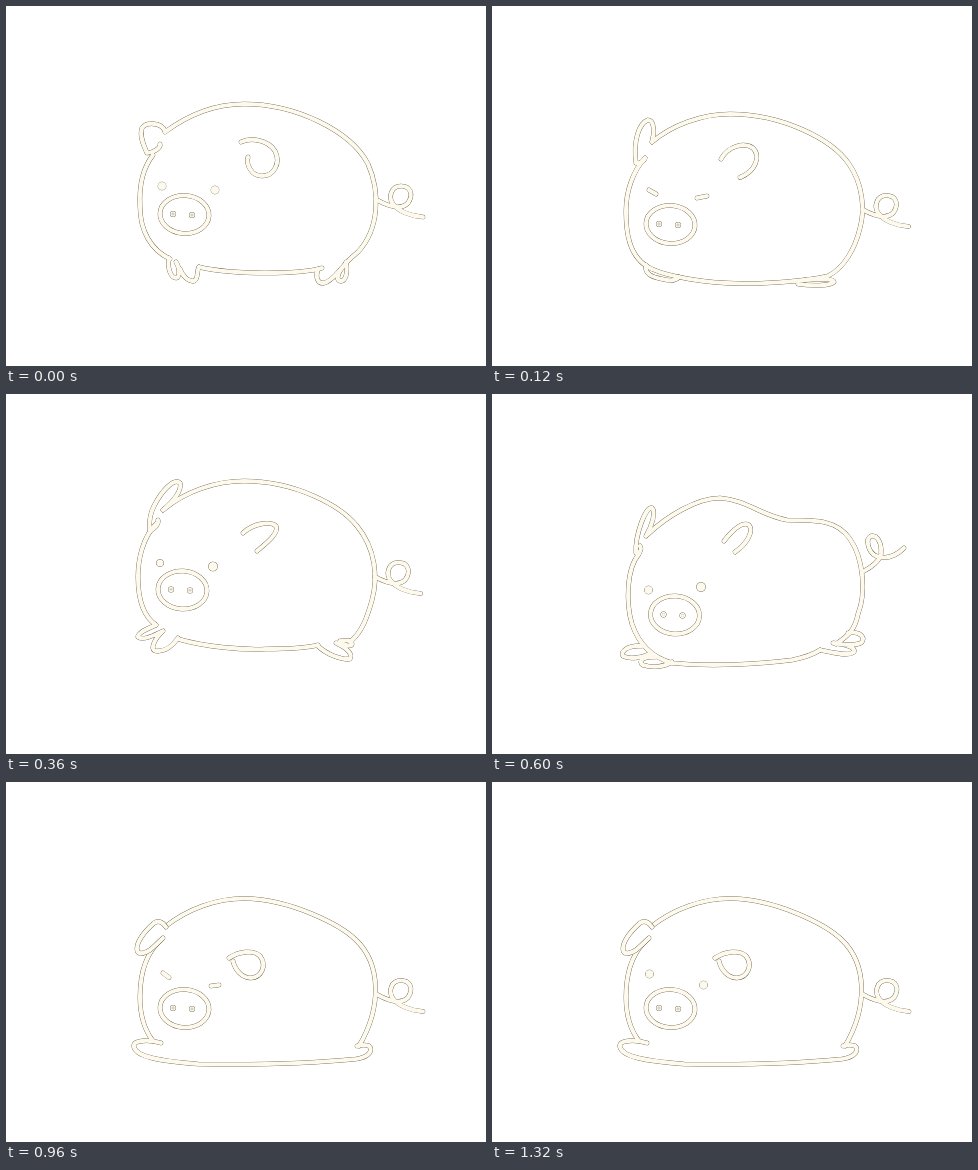
These frames come from a looping animation (480 px wide and 360 px high, 1920 ms). An HTML page:

```html
<!DOCTYPE html>
<html lang="en">
<head>
<meta charset="utf-8">
<title>Bouncing piglet</title>
<style>
html, body { margin: 0; width: 100%; height: 100%; overflow: hidden; background: #fff; }
svg { display: block; width: 100vw; height: 100vh; }

path, ellipse, circle {
  stroke: currentColor;
  fill: none;
  stroke-linecap: round;
  stroke-linejoin: round;
}
circle { fill: currentColor; }
.edge { color: #4a4228; stroke-width: 4.6px; }
.ink { color: #fdf9ec; stroke-width: 4.1px; }

/* each pose owns a slice of the 1920 ms loop */
.pose { visibility: hidden; animation: 1920ms step-end infinite; }
.stand { animation-name: stand; }
.dip { animation-name: dip; }
.crouch { animation-name: crouch; }
.leap { animation-name: leap; }
.land { animation-name: land; }
.flat { animation-name: flat; }
.perk { animation-name: perk; }
.droop { animation-name: droop; }
.shut { animation-name: shut; }
.open { animation-name: open; }
@keyframes stand { 0% { visibility: visible } 6.25%, 100% { visibility: hidden } }
@keyframes dip { 0% { visibility: hidden } 6.25% { visibility: visible } 12.5%, 100% { visibility: hidden } }
@keyframes crouch { 0% { visibility: hidden } 12.5% { visibility: visible } 18.75%, 100% { visibility: hidden } }
@keyframes leap { 0% { visibility: hidden } 18.75% { visibility: visible } 31.25%, 100% { visibility: hidden } }
@keyframes land { 0% { visibility: hidden } 31.25% { visibility: visible } 43.75%, 100% { visibility: hidden } }
@keyframes flat { 0% { visibility: hidden } 43.75%, 100% { visibility: visible } }
@keyframes perk { 0% { visibility: hidden } 43.75% { visibility: visible } 50%, 100% { visibility: hidden } }
@keyframes droop { 0% { visibility: hidden } 50%, 100% { visibility: visible } }
@keyframes shut { 0% { visibility: hidden } 43.75% { visibility: visible } 68.75%, 100% { visibility: hidden } }
@keyframes open { 0% { visibility: hidden } 68.75%, 100% { visibility: visible } }
</style>
</head>
<body>
<svg viewBox="0 0 480 360">
<defs>
  <!-- shared parts, placed for the standing pose -->
  <g id="snout">
    <ellipse cx="178.5" cy="208.5" rx="24.5" ry="19" transform="rotate(4 178.5 208.5)"/>
    <circle cx="167" cy="208" r=".7"/>
    <circle cx="186" cy="209" r=".7"/>
  </g>
  <path id="tail" d="M371 194C380 199 394 205 402 197C408 188 404 180 395 180C385 180 382 191 387 198C392 205 404 210 417 211"/>
  <g id="squint">
    <path d="M157 191L163 195.5"/>
    <path d="M205 204L213 203"/>
  </g>

  <g id="stand">
    <path d="M159 126C178 112 206 98 238 98C290 98 345 125 362 158C374 185 374 222 352 246C346 251 341 255 336 262"/>
    <path d="M147 149C136 163 133 180 134 200C134 225 145 244 164 253"/>
    <path d="M193 261C215 266 240 267 260 267C285 267 302 266 316 262"/>
    <path d="M159 125C155 116 140 116 136 122C133 130 138 140 141 147C147 147 155 142 154 138"/>
    <path d="M235 136C245 131 262 134 269 145C275 157 268 170 256 170C245 170 240 158 242 151"/>
    <path d="M163 252C161 262 165 272 170 272C174 271 174 262 170 256"/>
    <path d="M174 263C176 269 182 276 188 275C193 273 190 266 193 261"/>
    <path d="M312 263C309 272 312 278 318 277C326 275 330 268 336 262"/>
    <path d="M340 256C342 266 340 276 334 275C330 274 332 268 335 263"/>
    <circle cx="156" cy="180" r="2"/>
    <circle cx="209" cy="184" r="2"/>
    <use href="#snout"/>
    <use href="#tail"/>
  </g>

  <g id="dip">
    <path d="M160 136C180 119 210 108 238 108C290 108 340 133 357 158C371 178 373 204 368 222C363 243 352 262 336 270C315 275 275 278 250 277.5C210 277 175 270 160 263C135 252 134 222 134 205C134 185 141 165 153 152"/>
    <path d="M160 136C163 126 162 114 156 114C147 117 141 135 144 157C147 158 152 156 153 152"/>
    <path d="M229 153C236 140 252 136 261 142C269 150 264 165 248 171.5"/>
    <path d="M154 259C152 268 160 271 170 273C178 275 184 275 187 271"/>
    <path d="M306 278C320 280 338 280 342 276C342 272 325 273 312 274"/>
    <path d="M157 184L164 188"/>
    <path d="M205 192L215 190"/>
    <use href="#snout" y="10"/>
    <use href="#tail" x="-.5" y="9.5"/>
  </g>

  <g id="crouch">
    <path d="M160 144C182 127 210 116 238 116C285 116 335 143 350 158C371 178 375 210 367 235C361 254 350 269 336 276C315 280 275 282 250 282C210 282 175 277 158 269C135 258 134 232 134 215C134 195 138 172 156 157"/>
    <path d="M160 144C163 136 164 125 158 124C150 126 142 146 144 165C149 164 155 160 156 156"/>
    <path d="M226 165C234 155 247 151 255 156C260 163 253 174 240 179"/>
    <path d="M151 262C147 272 158 276 170 278C178 280 184 280 187 277"/>
    <path d="M308 281C322 283 340 282 344 279C345 276 330 277 318 278"/>
    <use href="#squint"/>
    <use href="#snout" y="18"/>
    <use href="#tail" y="18.5"/>
  </g>

  <g id="leap">
    <path d="M157 116C180 97 210 87 238 87C290 87 335 112 351 132C370 155 372 184 366 206C361 224 356 238 344 248"/>
    <path d="M150 130C137 143 132 165 132 183C132 205 137 222 150 231"/>
    <path d="M172 245C200 253 235 256 260 255C285 255 300 254 312 251"/>
    <path d="M157 116C168 107 176 96 174 89C168 83 155 98 148 112C143 122 143 130 144 137C149 134 153 130 152 126"/>
    <path d="M237 139C248 129 264 127 270 132C273 139 262 148 251 157"/>
    <path d="M150 231C140 235 131 240 132 243C138 247 148 241 157 237C149 244 143 256 150 257C160 258 168 250 172 244"/>
    <path d="M312 252C320 260 335 266 344 265C347 259 340 254 330 249C338 250 346 254 346 250C346 246 340 246 334 247"/>
    <circle cx="154" cy="169" r="1.5"/>
    <circle cx="207" cy="172.5" r="2.5"/>
    <use href="#snout" x="-2" y="-12.5"/>
    <use href="#tail" x="-2.5" y="-11.5"/>
  </g>

  <g id="land">
    <path d="M155 141C175 122 205 104 228 104C255 106 270 122 295 126C325 126 345 126 358 145C372 165 374 200 366 220C363 236 356 242 344 250"/>
    <path d="M147 160C134 175 134 210 140 230C145 245 155 262 180 269C220 273 270 270 300 266C315 263 322 260 328 256"/>
    <path d="M154 142C160 132 164 118 160 114C154 112 143 140 144 159C148 160 150 155 148 152"/>
    <path d="M232 147C240 137 250 127 257 131C262 137 255 150 243 158"/>
    <path d="M150 252C135 251 128 258 131 262C138 266 152 263 157 260"/>
    <path d="M163 263C152 262 145 267 151 271C160 274 172 273 180 268"/>
    <path d="M356 239C368 237 373 243 370 248C366 252 350 251 341 249C352 250 364 253 362 258C355 263 338 258 328 256"/>
    <path d="M372 177C378 174 388 167 389 160C390 150 386 141 379 142C373 145 376 158 384 162C395 166 405 161 412 154"/>
    <circle cx="156.5" cy="196" r="2"/>
    <circle cx="209" cy="193" r="2.5"/>
    <use href="#snout" x="4.5" y="12.5"/>
  </g>

  <g id="flat">
    <path d="M160 144C182 127 210 116.5 238 116.5C285 117 335 143 350 158C375 182 376 225 353 264"/>
    <path d="M156 157C138 172 134 195 134 215C134 235 140 250 147 259"/>
    <path d="M155 261C145 258 126 257 128 265C130 274 150 279 192 282C250 283 310 281 350 277C364 275 367 268 363 264C358 262 355 263 351 264"/>
    <use href="#snout" y="18"/>
    <use href="#tail" y="18.5"/>
  </g>
  <g id="perk">
    <path d="M160 143C163 137 167 130 163 128C154 126 145 150 144 165C149 164 155 160 156 156"/>
    <path d="M224 177C232 170 243 167 247 171C248 176 238 182 229 185"/>
  </g>
  <g id="droop">
    <path d="M160 145C157 140 152 138 148 141C138 150 131 160 131 167C131 173 138 172 144 168C150 163 154 159 157 156"/>
    <path d="M223 176C232 170 247 167 254 174C261 183 256 195 245 196C236 196 229 188 227 179"/>
  </g>
  <g id="open">
    <circle cx="157.5" cy="192" r="2"/>
    <circle cx="211.5" cy="203" r="2"/>
  </g>
</defs>

<g class="pose stand"><use href="#stand" class="edge"/><use href="#stand" class="ink"/></g>
<g class="pose dip"><use href="#dip" class="edge"/><use href="#dip" class="ink"/></g>
<g class="pose crouch"><use href="#crouch" class="edge"/><use href="#crouch" class="ink"/></g>
<g class="pose leap"><use href="#leap" class="edge"/><use href="#leap" class="ink"/></g>
<g class="pose land"><use href="#land" class="edge"/><use href="#land" class="ink"/></g>
<g class="pose flat"><use href="#flat" class="edge"/><use href="#flat" class="ink"/></g>
<g class="pose perk"><use href="#perk" class="edge"/><use href="#perk" class="ink"/></g>
<g class="pose droop"><use href="#droop" class="edge"/><use href="#droop" class="ink"/></g>
<g class="pose shut"><use href="#squint" class="edge"/><use href="#squint" class="ink"/></g>
<g class="pose open"><use href="#open" class="edge"/><use href="#open" class="ink"/></g>
</svg>
</body>
</html>
```
